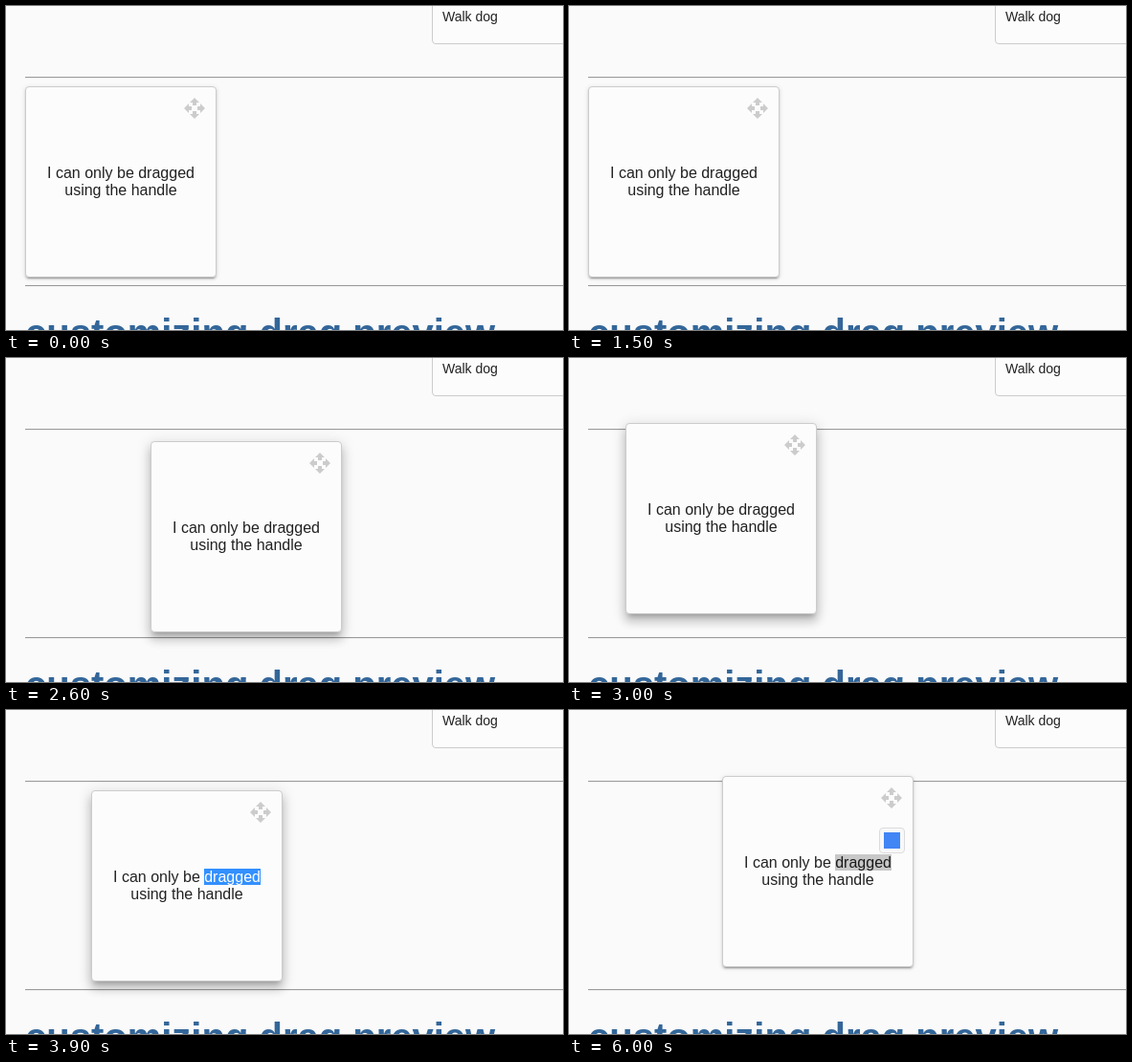
An HTML page that plays this animation: 582 px wide and 339 px high, repeating every 6100 ms.

```html
<!DOCTYPE html>
<html lang="en">
<head>
<meta charset="utf-8">
<title>Drag handle</title>
<style>
  html, body { margin: 0; width: 100%; height: 100%; overflow: hidden; background: #fafafa; }
  body { position: relative; font: 16px/18px "Liberation Sans", Arial, sans-serif; color: rgba(0, 0, 0, .87); }
  body > * { position: absolute; box-sizing: border-box; margin: 0; }
  .item { left: 445px; top: -20px; width: 300px; height: 60px; padding: 22px 10px; border: 1px solid #ccc; border-radius: 4px; background: #fcfcfc; font-size: 14px; line-height: 16px; }
  hr { left: 20px; width: 600px; height: 2px; border: solid; border-width: 1px 0; border-color: #9a9a9a transparent #eee; }
  h1 { left: 20px; top: 319px; font-size: 40px; line-height: 46px; color: #369; white-space: nowrap; }
  #card { left: 0; top: 0; width: 200px; height: 200px; border: 1px solid #ccc; border-radius: 4px; background: #fcfcfc; display: flex; align-items: center; justify-content: center; text-align: center; }
  #card svg { position: absolute; top: 10px; right: 10px; width: 24px; height: 24px; fill: #ccc; }
  #word.active { background: #3390ff; color: #fff; }
  #word.idle { background: #c8c8c8; }
  #popup { left: 0; top: 0; width: 27px; height: 27px; border: 1px solid #dcdcdc; border-radius: 4px; background: #f8f8f8; }
  #popup::after { content: ""; position: absolute; left: 4px; top: 4px; width: 17px; height: 17px; background: #4285f4; }
</style>
</head>
<body>
  <div class="item">Walk dog</div>
  <hr style="top: 74px">
  <hr style="top: 292px">
  <h1>customizing drag preview</h1>
  <div id="card">
    <svg viewBox="0 0 24 24"><path d="M10 9h4V6h3l-5-5-5 5h3v3zm-1 1H6V7l-5 5 5 5v-3h3v-4zm14 2l-5-5v3h-3v4h3v3l5-5zm-9 3h-4v3H7l5 5 5-5h-3v-3z"/></svg>
    <div>I can only be <span id="word">dragged</span><br>using the handle</div>
  </div>
  <div id="popup"></div>
<script>
  const LOOP = 6100;
  const [card, word, popup] = ['card', 'word', 'popup'].map(id => document.getElementById(id));

  // Each shadow layer: y, blur, spread, alpha
  const REST = [[3, 1, -2, .2], [2, 2, 0, .14], [1, 5, 0, .12]];
  const RAISED = [[5, 5, -3, .2], [8, 10, 1, .14], [3, 14, 2, .12]];

  // Every step changes only the listed properties
  const STEPS = [
    { t: 0, x: 20, y: 84, lift: 0, sel: '', pop: null },
    // press on the body: nothing moves
    { t: 700, lift: .8 }, { t: 800, lift: 1 },
    { t: 1100, lift: .2 }, { t: 1200, lift: 0, pop: [216, 202] },
    { t: 1400, lift: .5, pop: null }, { t: 1500, lift: 0 },
    // drag by the handle
    { t: 2400, x: 28, y: 90, lift: .8 },
    { t: 2500, x: 98, y: 112, lift: 1 },
    { t: 2600, x: 151, y: 87 },
    { t: 2700, x: 124, y: 42 },
    { t: 2800, x: 86, y: 21 },
    { t: 2900, x: 62, y: 38 },
    { t: 3000, x: 59, y: 68 },
    { t: 3100, x: 68, y: 78 },
    { t: 3200, x: 82, y: 83 },
    { t: 3300, x: 89, y: 84 },
    { t: 3400, lift: .2 }, { t: 3500, lift: 0 },
    // select a word
    { t: 3700, lift: .5 }, { t: 3800, lift: .8, sel: 'active' }, { t: 3900, lift: 1 },
    { t: 4100, lift: .2 }, { t: 4200, lift: 0 }, { t: 4300, pop: [298, 186] },
    // drag again, then reselect
    { t: 4900, lift: .8, sel: '', pop: null },
    { t: 5000, x: 112, y: 79 },
    { t: 5100, x: 146, y: 72 },
    { t: 5200, x: 160, y: 69, lift: .2, sel: 'active' },
    { t: 5300, lift: 0, pop: [324, 123] },
    { t: 6000, sel: 'idle' }
  ];

  const move = (el, x, y) => { el.style.transform = `translate(${x}px, ${y}px)`; };

  const shadow = lift => REST.map((layer, i) => {
    const [y, blur, spread, alpha] = layer.map((v, j) => v + (RAISED[i][j] - v) * lift);
    return `0 ${y}px ${blur}px ${spread}px rgba(0, 0, 0, ${alpha})`;
  }).join(', ');

  function draw() {
    const now = performance.now() % LOOP;
    const s = Object.assign({}, ...STEPS.filter(step => step.t <= now));
    move(card, s.x, s.y);
    card.style.boxShadow = shadow(s.lift);
    word.className = s.sel;
    popup.hidden = !s.pop;
    if (s.pop) move(popup, ...s.pop);
    requestAnimationFrame(draw);
  }
  draw();
</script>
</body>
</html>
```
